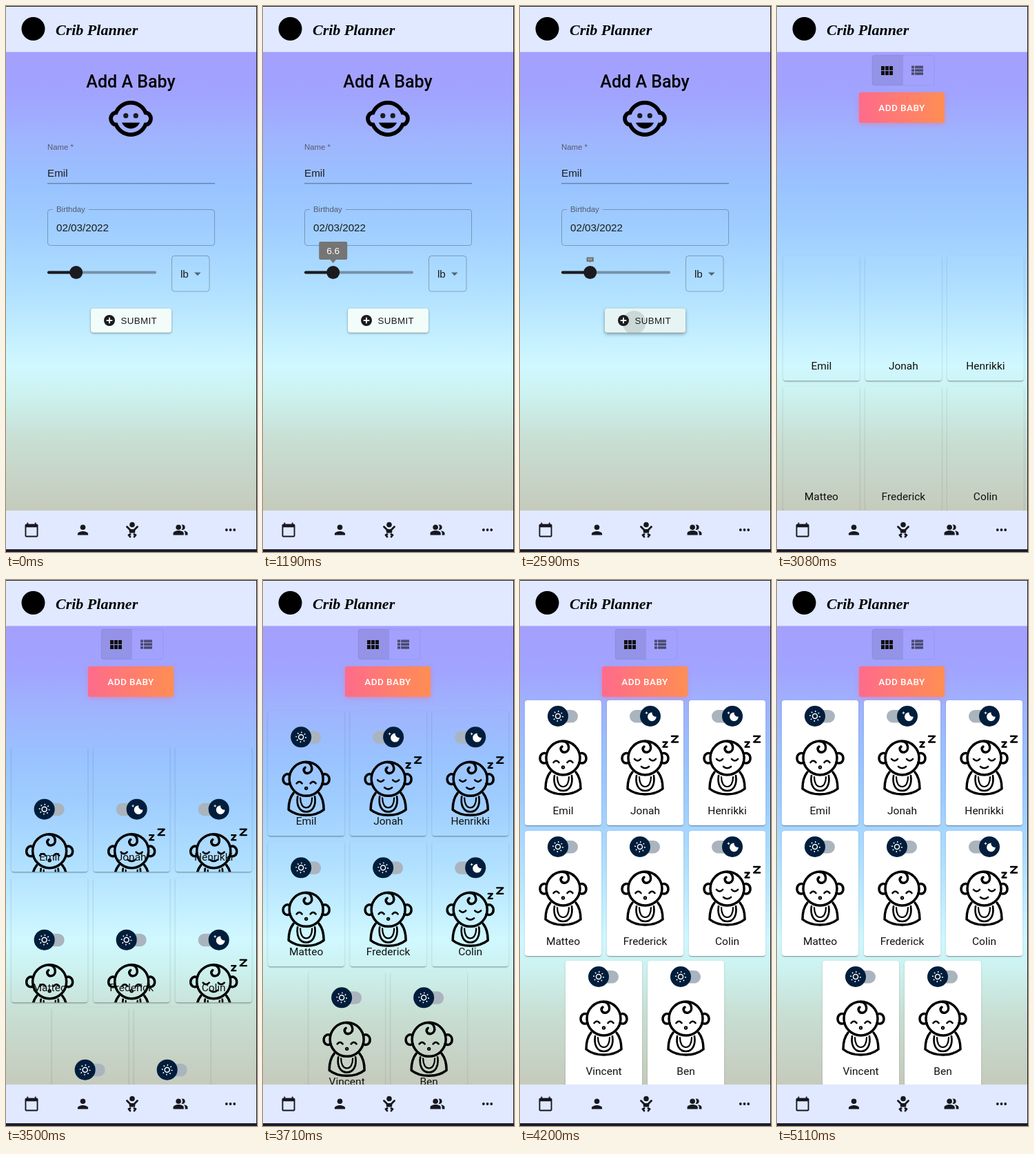
An HTML page that plays this animation: 364x790 px, repeating every 5.39 s.

```html
<!DOCTYPE html>
<html lang="en">
<head>
<meta charset="utf-8">
<title>Add a baby</title>
<style>
  html, body { margin: 0; width: 100%; height: 100%; overflow: hidden; }
  body {
    position: relative;
    background: linear-gradient(#a49ffe 67px, #a1a4fe 130px, #9fb4fe 190px, #99c3ff 260px, #9fcdff 320px,
      #b0e0ff 410px, #d0f8ff 520px, #ccf1ee 565px, #c8ded3 630px, #c5cbbc 728px);
  }
  svg { display: block; overflow: visible; }
  .layer { position: absolute; left: 0; top: 0; width: 364px; height: 790px; overflow: hidden; }
  .sans { font: 15.2px "Liberation Sans", Arial, sans-serif; }
  .title { font: 500 25px Roboto, sans-serif; }
  .add { font: 500 13.6px Roboto, sans-serif; letter-spacing: .38px; }
  .brand { font: italic bold 22px "Liberation Serif", serif; }
  .card {
    position: absolute; width: 111px; height: 181px; border-radius: 4px; overflow: hidden;
    box-shadow: 0 2px 1px -1px #0003, 0 1px 1px #0002, 0 1px 3px #0002;
  }
  .card svg { position: absolute; left: 0; top: 0; }
  .card span {
    position: absolute; left: 0; right: 0; top: 150px; text-align: center;
    font: 15.5px/20px Roboto, sans-serif; color: #111;
  }
  .line { fill: none; stroke: #000; stroke-linecap: round; stroke-linejoin: round; }
</style>
</head>
<body>
<div class="layer" id="form">
  <svg width="364" height="790" class="sans" fill="#1b1b1f">
    <text class="title" x="181" y="118" text-anchor="middle" fill="#000">Add A Baby</text>
    <g transform="translate(146.2 128.2) scale(2.9)">
      <path d="M4.6 9A8 8 0 0 1 19.4 9a2.6 3 0 0 1 0 6A8 8 0 0 1 4.6 15a2.6 3 0 0 1 0-6z" fill="none" stroke="#000" stroke-width="2"/>
      <path d="M7.5 14c.76 1.77 2.49 3 4.5 3s3.74-1.23 4.5-3z" fill="#000"/>
      <circle cx="9.5" cy="10.5" r="1.25"/><circle cx="14.5" cy="10.5" r="1.25"/>
    </g>
    <text x="60" y="208" font-size="11.4" fill="#555a6c">Name *</text>
    <text x="60" y="247">Emil</text>
    <path d="M60 256.8H303" stroke="#0007"/>
    <path d="M68 294.5h-3.5a4 4 0 0 0-4 4v44a4 4 0 0 0 4 4h234a4 4 0 0 0 4-4v-44a4 4 0 0 0-4-4H120" fill="none" stroke="#0004"/>
    <text x="73" y="298" font-size="11.4" fill="#555a6c">Birthday</text>
    <text x="73" y="326">02/03/2022</text>
    <rect x="60" y="383.6" width="158" height="3.8" rx="1.9" opacity=".38"/>
    <rect x="60" y="383.6" width="42" height="3.8" rx="1.9"/>
    <circle cx="101.7" cy="385.5" r="9.5"/>
    <g id="tip">
      <rect x="-20.5" y="-30" width="41" height="26" rx="2" fill="#757575"/>
      <path d="M-5-5H5L0 1z" fill="#757575"/>
      <text y="-12" font-size="13.6" text-anchor="middle" fill="#fff">6.6</text>
    </g>
    <rect x="240.5" y="361.5" width="54.5" height="51.5" rx="4" fill="none" stroke="#0004"/>
    <text x="253" y="393">lb</text>
    <path d="M273 385.5h9.6l-4.8 4.8z" fill="#0008"/>
    <clipPath id="buttonClip"><rect x="123" y="437.5" width="117" height="35" rx="4"/></clipPath>
    <rect id="button" x="123" y="437.5" width="117" height="35" rx="4"/>
    <g clip-path="url(#buttonClip)"><circle id="ripple" cx="165.5" cy="458" fill="#203020"/></g>
    <circle cx="150" cy="455" r="8"/>
    <path d="M145.7 455h8.6M150 450.7v8.6" stroke="#f0fdf9" stroke-width="1.9"/>
    <text x="166.5" y="459.7" font-size="13.3" letter-spacing=".38">SUBMIT</text>
  </svg>
</div>

<div class="layer" id="list">
  <svg width="364" height="790">
    <defs>
      <linearGradient id="warm"><stop stop-color="#fe6b8b"/><stop offset="1" stop-color="#ff8e53"/></linearGradient>
    </defs>
    <rect x="138" y="71" width="90" height="44" rx="4" fill="none" stroke="#0001"/>
    <path d="M183 71h-41a4 4 0 0 0-4 4v36a4 4 0 0 0 4 4h41z" fill="#00000017"/>
    <path d="M151 87h5v6h-5zm6 0h5v6h-5zm6 0h5v6h-5zm-12 7h5v6h-5zm6 0h5v6h-5zm6 0h5v6h-5z" fill="#111"/>
    <path d="M195 88.3h4m1 0h12M195 93.1h4m1 0h12M195 97.9h4m1 0h12" stroke="#4c4c72" stroke-width="3.7"/>
    <rect x="119" y="125" width="124" height="44" rx="3" fill="url(#warm)" style="filter:drop-shadow(0 2px 3px #ff698780)"/>
    <text class="add" x="181" y="151.5" text-anchor="middle" fill="#fff">ADD BABY</text>
  </svg>
</div>

<div class="layer">
  <svg width="364" height="790" fill="#17181f">
    <path d="M0 0H364V66.5H0zM0 730H364V786H0z" fill="#e0e9ff"/>
    <circle cx="39.5" cy="33" r="17" fill="#000"/>
    <text class="brand" x="72" y="42" fill="#000">Crib Planner</text>
    <path transform="translate(25.6 746.6) scale(.95)" fill-rule="evenodd"
      d="M20 3h-1V1h-2v2H7V1H5v2H4c-1.1 0-2 .9-2 2v16c0 1.1.9 2 2 2h16c1.1 0 2-.9 2-2V5c0-1.1-.9-2-2-2zM20 21H4V8h16z"/>
    <g transform="translate(100.1 746.6) scale(.95)">
      <circle cx="12" cy="8" r="4"/><path d="M12 14c-2.7 0-8 1.3-8 4v2h16v-2c0-2.7-5.3-4-8-4z"/>
    </g>
    <g transform="translate(183 758)">
      <circle cy="-7.5" r="3.8"/>
      <path d="M-4.5-1h9L4 4.5h-8z"/>
      <path d="M-7.5-4.5L-3.5-.5M7.5-4.5L3.5-.5M-3 6.5l-2 1 2 2.5M3 6.5l2 1-2 2.5" fill="none" stroke="#17181f" stroke-width="2.8" stroke-linecap="round" stroke-linejoin="round"/>
    </g>
    <g transform="translate(241.6 746.6) scale(.95)">
      <circle cx="9" cy="8" r="4"/><path d="M9 13c-2.7 0-8 1.3-8 4v3h16v-3c0-2.7-5.3-4-8-4z"/>
      <path d="M15 12a4 4 0 0 0 0-8l-1.3.2a6 6 0 0 1 0 7.6zM16.7 13.1C18.2 14.1 19 15.4 19 17v3h4v-3c0-2.2-3.5-3.5-6.3-3.9z"/>
    </g>
    <circle cx="319.8" cy="758" r="1.9"/><circle cx="325.5" cy="758" r="1.9"/><circle cx="331.2" cy="758" r="1.9"/>
    <path d="M0 786H364V790H0zM363 0h1v790h-1zM0 0h364v1H0z" fill="#1c1c2c"/>
  </svg>
</div>

<script>
const LOOP = 5390, STEP = 70;
const $ = id => document.getElementById(id);
const clamp = x => x < 0 ? 0 : x > 1 ? 1 : x;

function bezier(x1, y1, x2, y2) {
  const at = (a, b, s) => 3 * a * s * (1 - s) ** 2 + 3 * b * s * s * (1 - s) + s ** 3;
  return x => {
    let lo = 0, hi = 1;
    for (let i = 0; i < 24; i++) {
      const mid = (lo + hi) / 2;
      if (at(x1, x2, mid) < x) lo = mid; else hi = mid;
    }
    return at(y1, y2, lo);
  };
}
const easeInOut = bezier(.42, 0, .58, 1);
const standard = bezier(.4, 0, .2, 1);
const tween = (t, start, duration, ease) => {
  const x = clamp((t - start) / duration);
  return x === 0 || x === 1 ? x : ease(x);
};

const sun = `<circle r="3.5" fill="none" stroke="#fff" stroke-width="1.5"/>
  <circle r="6.9" fill="none" stroke="#fff" stroke-width="2" pathLength="44" stroke-dasharray="1.5 4"/>`;
const moon = `<path transform="translate(-9.5 -9.5) scale(.95)" fill="#fff"
  d="M4.2 2.5l-.7 1.8-1.8.7 1.8.7.7 1.8.6-1.8L6.7 5l-1.9-.7zM19.2 10.8a6.7 6.7 0 1 1-6.6-6.6 5.8 5.8 0 0 0 6.6 6.6z"/>`;
const awakeFace = `<path d="M41.5 90q4-5 8 0M61.5 90q4-5 8 0" stroke-width="2.6"/>
  <circle cx="55.5" cy="97" r="1.7" stroke-width="2"/>`;
const asleepFace = `<path d="M40 85q4.5 5 9 0M62 85q4.5 5 9 0M50 96q5.5 4.5 11 0" stroke-width="2.6"/>
  <path d="M81.5 60.5h6l-6 7h6M94 52h9l-9 8.5h9" stroke-width="2.4"/>`;

const drawing = asleep => `<svg width="111" height="181">
  <rect x="33" y="14" width="44" height="18.5" rx="9.2" fill="#aab4be"/>
  <g transform="translate(${asleep ? 63 : 48} 23)"><circle r="15" fill="#001e3c"/>${asleep ? moon : sun}</g>
  <g class="line" stroke-width="3.5">
    <circle cx="55.5" cy="83.5" r="24.5"/>
    <path d="M31 77c-5-2-9 2-9 7s4 9 10 6M80 77c5-2 9 2 9 7s-4 9-10 6"/>
    <path d="M55 59.5c9 0 12 13 4 15.5c-6 1.5-9-5-5-8"/>
    <path d="M37 104C32 110 30 119 30 128Q40 136 55.5 136T81 128C81 119 79 110 74 104"/>
    <path d="M43 109C41 122 46 131 55.5 131S70 122 68 109" stroke-width="2.7"/>
    <path d="M47 111c0 8 3 14 8.5 14s8.5-6 8.5-14" stroke-width="2.2"/>
    ${asleep ? asleepFace : awakeFace}
  </g></svg>`;

const babies = [
  ["Emil", 7, 0], ["Jonah", 126, 0, true], ["Henrikki", 245, 0, true],
  ["Matteo", 7, 1], ["Frederick", 126, 1], ["Colin", 245, 1, true],
  ["Vincent", 66, 2], ["Ben", 185, 2]
];
const cards = babies.map(([name, x, row, asleep]) => {
  const card = document.createElement("div");
  card.className = "card";
  card.style.left = x + "px";
  card.style.top = 174 + row * 188.5 + "px";
  card.innerHTML = drawing(asleep) + `<span>${name}</span>`;
  $("list").append(card);
  return card;
});

function drawForm(t) {
  const tip = tween(t, 750, 150, standard) - tween(t, 2518, 150, standard);
  $("tip").setAttribute("transform", `translate(101.7 371) scale(${tip})`);

  const pressed = t >= 2520;
  $("button").setAttribute("fill", pressed ? "#e6f5f4" : "#f2fdfa");
  $("button").style.filter = `drop-shadow(0 ${pressed ? 2 : 1}px ${pressed ? 2.5 : 1.5}px #0006)`;
  $("ripple").setAttribute("r", pressed ? 8 + (t - 2520) * .13 : 0);
  $("ripple").setAttribute("opacity", .14 * (1 - clamp((t - 2590) / 210)));
}

function drawList(t) {
  const offset = 200 * (1 - tween(t, 2903, 1000, easeInOut));
  const white = tween(t, 3900, 300, easeInOut);
  for (const card of cards) {
    card.style.transform = `translate(${offset * .01}px, ${offset}px)`;
    card.style.backgroundColor = `rgba(255, 255, 255, ${white})`;
    card.firstChild.style.transform = `translateY(${offset}px)`;
  }
}

function frame(now) {
  const t = Math.floor((now % LOOP) / STEP) * STEP;
  const listShown = t >= 2940;
  $("form").style.display = listShown ? "none" : "";
  $("list").style.display = listShown ? "" : "none";
  if (listShown) drawList(t); else drawForm(t);
}

const start = performance.now();
function tick() {
  frame(performance.now() - start);
  requestAnimationFrame(tick);
}
tick();
</script>
</body>
</html>
```
